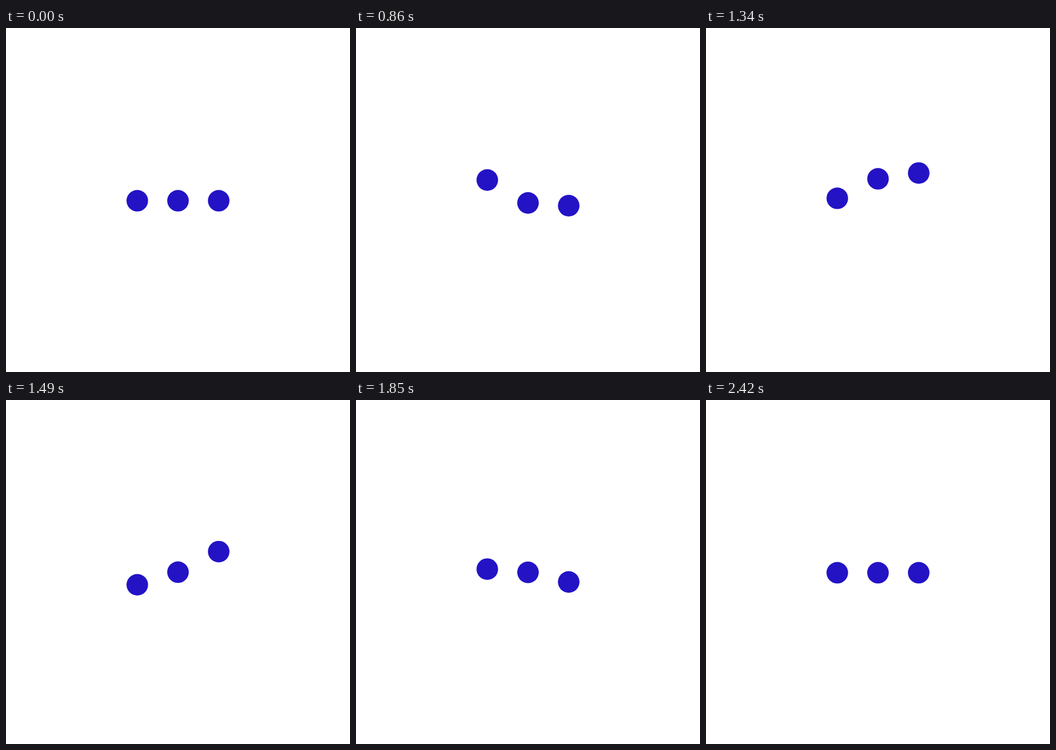
These frames come from a looping animation (600 by 600 pixels, 2.45 s). An HTML page:

```html
<!DOCTYPE html>
<html lang="en">
<head>
<meta charset="utf-8">
<title>Bouncing dots</title>
<style>
  html, body { margin: 0; width: 100%; height: 100%; overflow: hidden; background: #fff; }
  svg { display: block; width: 100%; height: 100%; }
</style>
</head>
<body>
<svg viewBox="0 0 600 600" fill="#2313c5">
  <circle cx="229" cy="301.3" r="18.8"/>
  <circle cx="300" cy="301.3" r="18.8"/>
  <circle cx="371" cy="301.3" r="18.8"/>
</svg>
<script>
const LOOP = 2450, START = 530, STEP = 30, DELAY = 140;
const THIRD = 1 / 3;

// Each key: time, y, and the horizontal ease handles leading to it
const keys = [
  { t: 498, y: 301.3 },
  { t: 640, y: 315.3, out: THIRD, in: 2 * THIRD },
  { t: 1027, y: 252.7, out: THIRD, in: THIRD },
  { t: 1480, y: 322.3, out: 2 * THIRD, in: 2 * THIRD },
  { t: 1895, y: 294.7, out: THIRD, in: THIRD },
  { t: 2140, y: 301.3, out: THIRD, in: 2 * THIRD }
];
const dots = document.querySelectorAll('circle');

// Cubic Bezier ease through (x1, 0) and (x2, 1)
function ease(x, x1, x2) {
  let lo = 0, hi = 1;
  for (let i = 0; i < 24; i++) {
    const s = (lo + hi) / 2, r = 1 - s;
    if (3 * r * r * s * x1 + 3 * r * s * s * x2 + s * s * s < x) lo = s;
    else hi = s;
  }
  return lo * lo * (3 - 2 * lo);
}

function height(t) {
  const i = keys.findIndex(key => key.t > t);
  if (i < 1) return keys[0].y;
  const a = keys[i - 1], b = keys[i];
  return a.y + (b.y - a.y) * ease((t - a.t) / (b.t - a.t), b.out, b.in);
}

function draw() {
  const now = performance.now() % LOOP;
  const t = now < START ? 0 : START + Math.floor((now - START) / STEP) * STEP;
  dots.forEach((dot, i) => dot.setAttribute('cy', height(t - i * DELAY)));
  requestAnimationFrame(draw);
}
draw();
</script>
</body>
</html>
```
